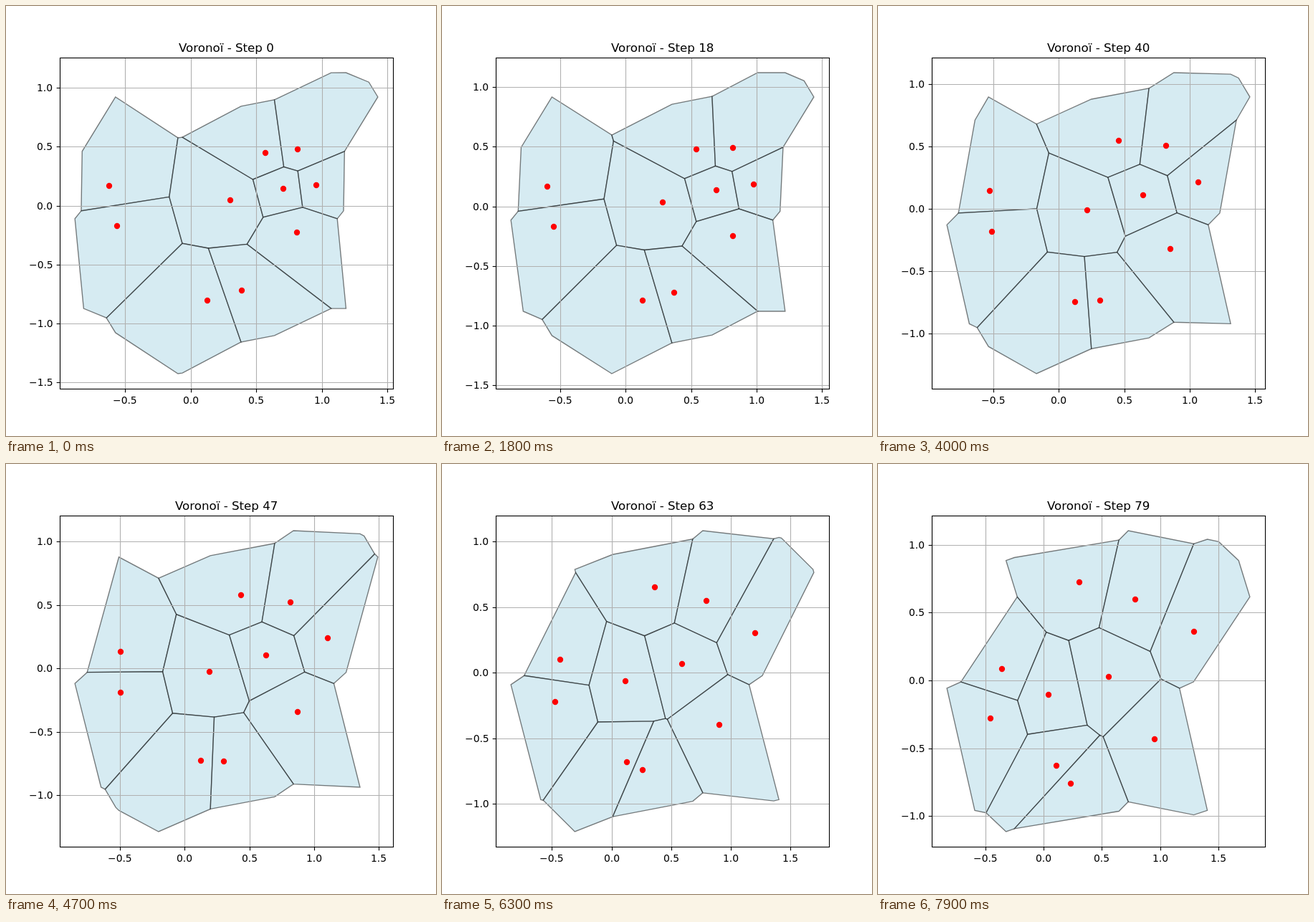
An HTML page with a canvas for the animation above (8 s loop, 600 by 600 pixels).

```html
<!DOCTYPE html>
<html lang="en">
<head>
<meta charset="utf-8">
<title>Voronoï</title>
<style>
  html, body { margin: 0; width: 100%; height: 100%; overflow: hidden; background: #fff; }
  canvas { display: block; }
</style>
</head>
<body>
<canvas id="plot" width="600" height="600"></canvas>
<script>
const ctx = document.getElementById('plot').getContext('2d');
const STEP_MS = 100, STEPS = 80, PERIOD = 2;
const PT = 100 / 72;
const BOX = { left: 75, right: 540, top: 72, bottom: 534 };

// Key steps, and each seed's path through them in thousandths: xs, ys.
const KEYS = [0, 18, 28, 40, 53, 63, 79];
const PATHS = [
  [[-622, -600, -573, -530, -468, -428, -357], [169, 166, 159, 145, 120, 101, 87]],
  [[-562, -547, -533, -511, -481, -471, -460], [-171, -171, -171, -182, -198, -221, -280]],
  [[302, 282, 261, 219, 166, 118, 41], [47, 34, 18, -10, -44, -65, -108]],
  [[569, 540, 508, 460, 411, 365, 306], [448, 478, 508, 548, 610, 653, 723]],
  [[815, 819, 820, 818, 811, 797, 787], [479, 490, 496, 507, 532, 549, 596]],
  [[706, 693, 678, 647, 617, 593, 559], [145, 136, 124, 111, 91, 67, 24]],
  [[957, 978, 1012, 1065, 1143, 1206, 1292], [175, 184, 195, 214, 264, 302, 358]],
  [[810, 819, 831, 851, 886, 906, 953], [-226, -249, -277, -320, -368, -399, -436]],
  [[128, 129, 129, 125, 126, 126, 110], [-802, -789, -772, -747, -709, -680, -631]],
  [[390, 369, 349, 318, 286, 259, 232], [-720, -724, -727, -733, -736, -743, -761]]
];

// Slope at key i of the parabola through the three nearest keys.
function slope(v, i) {
  const m = Math.min(Math.max(i, 1), KEYS.length - 2);
  const h0 = KEYS[m] - KEYS[m - 1], h1 = KEYS[m + 1] - KEYS[m];
  const d0 = (v[m] - v[m - 1]) / h0, d1 = (v[m + 1] - v[m]) / h1;
  const bend = (d1 - d0) / (h0 + h1);
  return d0 + bend * h0 + 2 * bend * (KEYS[i] - KEYS[m]);
}

// Cubic Hermite interpolation.
function valueAt(v, step) {
  let i = 0;
  while (i < KEYS.length - 2 && step >= KEYS[i + 1]) i++;
  const h = KEYS[i + 1] - KEYS[i], u = (step - KEYS[i]) / h, w = 1 - u;
  return (w * w * ((1 + 2 * u) * v[i] + u * h * slope(v, i)) +
          u * u * ((1 + 2 * w) * v[i + 1] - w * h * slope(v, i + 1))) / 1000;
}

// Keep the part of a polygon nearer to p than to p + (dx, dy).
function clip(poly, p, dx, dy) {
  const half = (dx * dx + dy * dy) / 2;
  const side = q => (q[0] - p[0]) * dx + (q[1] - p[1]) * dy - half;
  const out = [];
  poly.forEach((a, i) => {
    const b = poly[(i + 1) % poly.length], sa = side(a), sb = side(b);
    if (sa <= 0) out.push(a);
    if (sa < 0 && sb > 0 || sa > 0 && sb < 0) {
      const k = sa / (sa - sb);
      out.push([a[0] + k * (b[0] - a[0]), a[1] + k * (b[1] - a[1])]);
    }
  });
  return out;
}

// Voronoi cell of p on the torus.
function cellOf(p, seeds) {
  let poly = [[-1, -1], [1, -1], [1, 1], [-1, 1]].map(c => [p[0] + c[0], p[1] + c[1]]);
  for (const q of seeds) {
    if (q === p) continue;
    for (let i = -2; i <= 2; i++)
      for (let j = -2; j <= 2; j++)
        poly = clip(poly, p, q[0] - p[0] + i * PERIOD, q[1] - p[1] + j * PERIOD);
  }
  for (const [i, j] of [[1, 1], [1, -1], [-1, 1], [-1, -1]])
    poly = clip(poly, p, i * PERIOD, j * PERIOD);
  return poly;
}

// Linear map of the values, with 5% margins, onto the pixels from..to.
function axis(values, from, to) {
  const min = Math.min(...values), max = Math.max(...values), pad = (max - min) * 0.05;
  const lo = min - pad, hi = max + pad;
  const px = v => from + (v - lo) / (hi - lo) * (to - from);
  const ticks = [];
  for (let k = Math.ceil(lo * 2); k <= hi * 2; k++)
    ticks.push({ at: Math.round(px(k / 2)), label: (k < 0 ? '\u2212' : '') + Math.abs(k / 2).toFixed(1) });
  return { px, ticks };
}

function line(x0, y0, x1, y1, color) {
  ctx.strokeStyle = color;
  ctx.lineWidth = 0.8 * PT;
  ctx.beginPath();
  ctx.moveTo(x0, y0);
  ctx.lineTo(x1, y1);
  ctx.stroke();
}

function text(str, size, x, y, anchor) {
  ctx.font = `${size * PT}px "DejaVu Sans", sans-serif`;
  ctx.fillStyle = '#000';
  ctx.fillText(str, Math.round(x - ctx.measureText(str).width * anchor), y);
}

function draw(step) {
  const seeds = PATHS.map(([xs, ys]) => [valueAt(xs, step), valueAt(ys, step)]);
  const cells = seeds.map(p => cellOf(p, seeds));
  const corners = cells.flat();
  const { left, right, top, bottom } = BOX;
  const X = axis(corners.map(c => c[0]), left, right);
  const Y = axis(corners.map(c => c[1]), bottom, top);

  ctx.fillStyle = '#fff';
  ctx.fillRect(0, 0, 600, 600);

  ctx.lineWidth = PT;
  ctx.fillStyle = 'rgba(173, 216, 230, 0.5)';
  ctx.strokeStyle = 'rgba(0, 0, 0, 0.5)';
  for (const cell of cells) {
    ctx.beginPath();
    for (const [x, y] of cell) ctx.lineTo(X.px(x), Y.px(y));
    ctx.closePath();
    ctx.fill();
    ctx.stroke();
  }

  for (const { at } of X.ticks) line(at + 0.5, top, at + 0.5, bottom, '#b0b0b0');
  for (const { at } of Y.ticks) line(left, at + 0.5, right, at + 0.5, '#b0b0b0');

  ctx.fillStyle = '#f00';
  for (const [x, y] of seeds) {
    ctx.beginPath();
    ctx.arc(Math.round(X.px(x)), Math.round(Y.px(y)), 3 * PT, 0, 2 * Math.PI);
    ctx.fill();
  }

  const tick = 3.5 * PT;
  for (const { at, label } of X.ticks) {
    line(at + 0.5, bottom + 0.5, at + 0.5, bottom + 0.5 + tick, '#000');
    text(label, 10, at, 555, 0.5);
  }
  for (const { at, label } of Y.ticks) {
    line(left + 0.5, at + 0.5, left + 0.5 - tick, at + 0.5, '#000');
    text(label, 10, left - 2 * tick, at + 5, 1);
  }
  ctx.lineWidth = 0.8 * PT;
  ctx.strokeRect(left + 0.5, top + 0.5, right - left, bottom - top);
  text('Voronoï - Step ' + step, 12, (left + right) / 2, 64, 0.5);
}

let shown = -1;
function frame() {
  const step = Math.floor(performance.now() / STEP_MS) % STEPS;
  if (step !== shown) draw(shown = step);
  requestAnimationFrame(frame);
}
frame();
</script>
</body>
</html>
```
